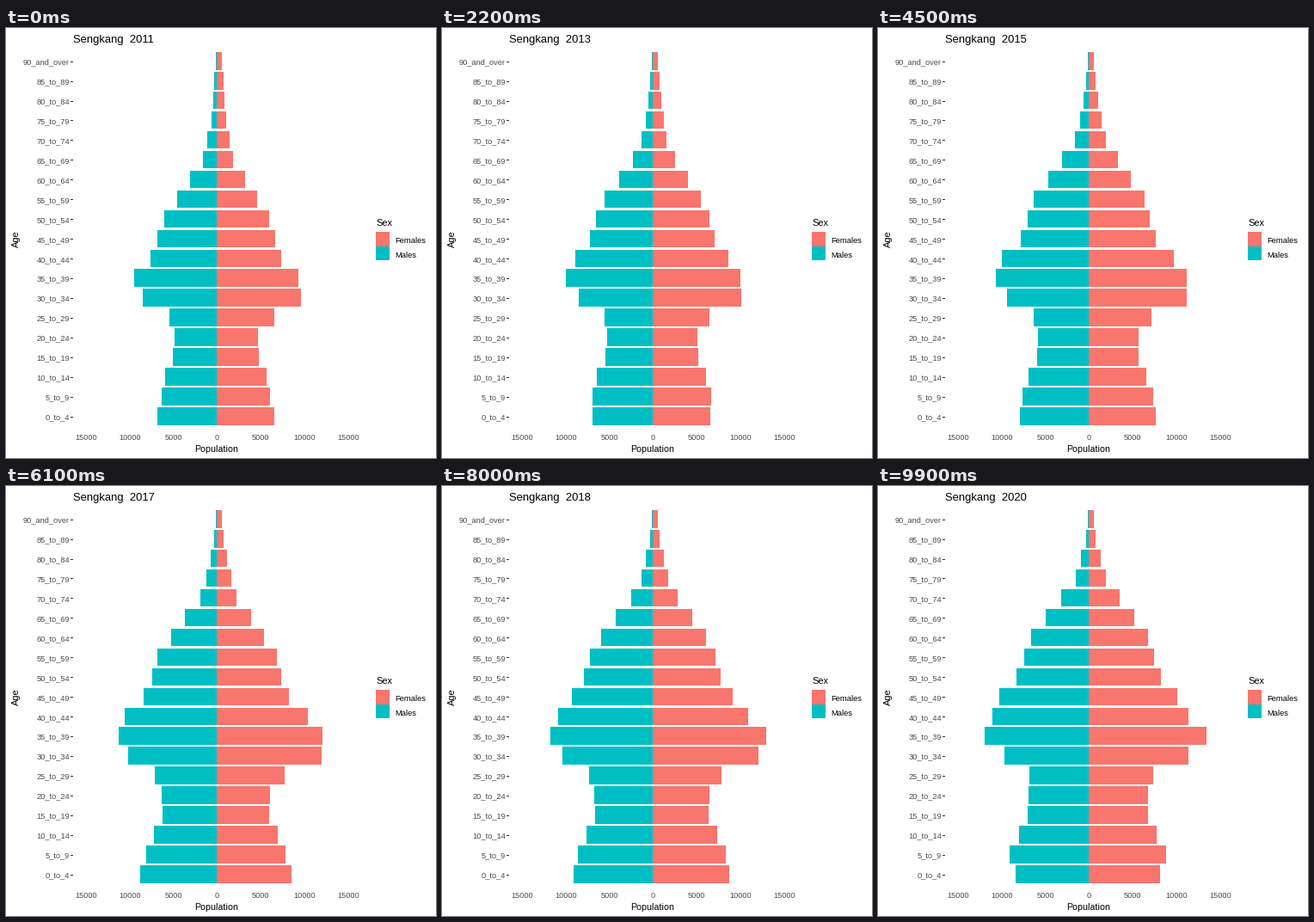
These frames come from a looping animation (500x500 px, 10 s). A matplotlib script:

```python
import numpy as np
import matplotlib.pyplot as plt
from matplotlib.animation import FuncAnimation
from matplotlib.patches import Rectangle

SIZE, DPI = 500, 100
FRAMES, STEPS_PER_YEAR = 100, 11
SALMON, TEAL, GREY = "#F8766D", "#00BFC4", "#4D4D4D"
ZERO, PX_PER_5000 = 245, 50.8
BOTTOM, PITCH, BAR_H = 451.28, 22.94, 20.46

AGES = [f"{a}_to_{a + 4}" for a in range(0, 90, 5)] + ["90_and_over"]
GROUP = np.arange(len(AGES))

# Corners of the male outline: (age group, bar length in pixels)
FIRST = [(0, 69), (2, 60), (3, 51), (4, 49), (5, 55), (6, 86), (7, 96),
         (8, 77), (10, 61), (13, 16), (15, 6), (18, 1)]
LAST = [(0, 85), (1, 92), (3, 71), (5, 69), (6, 98), (7, 121), (9, 104),
        (10, 84), (12, 67), (15, 15), (17, 3), (18, 1)]


def outline(points):
    return np.interp(GROUP, *zip(*points))


def bump(center, height, width):
    return height * np.exp(-((GROUP - center) / width) ** 2)


def males(t):
    """Drift from first to last outline, with passing swells on the way."""
    arch = np.sin(np.pi * t)
    late = 0.6 * arch - 0.7 * np.sin(2 * np.pi * t)
    late_swell = bump(0, 10, 0.6) + bump(5.6, 10, 1.2)
    ripple = (bump(8, 8, 0.4) - bump(9, 6, 0.4)
              + bump(11, 5, 0.4) - bump(14, 5, 0.4))
    drift = (1 - t) * outline(FIRST) + t * outline(LAST)
    return drift + late * late_swell + arch * ripple


def females(t):
    """Slightly fewer young, more old, and a surplus that ages over time."""
    surplus = bump(5.5 + 0.9 * t, 21 + t, 0.86 + 0.54 * t)
    return males(t) + np.interp(GROUP, [8, 15], [-2.5, 5]) + surplus


plt.rcParams["font.family"] = "Liberation Sans"
fig = plt.figure(figsize=(SIZE / DPI, SIZE / DPI), dpi=DPI, facecolor="white")
ax = fig.add_axes([0, 0, 1, 1])
ax.set(xlim=(0, SIZE), ylim=(SIZE, 0))
ax.axis("off")


def label(x, y, s, px, color="black", ha="left", **kw):
    return ax.text(x, y, s, fontsize=px * 72 / DPI, color=color, ha=ha,
                   va="baseline", **kw)


def box(x, y, w, h, color):
    return ax.add_patch(Rectangle((x, y), w, h, facecolor=color, linewidth=0,
                                  antialiased=False))


title = label(78, 17, "", 13)
label(244.5, 493, "Population", 10.6, ha="center")
label(15, 245.5, "Age", 11, ha="center", rotation=90, rotation_mode="anchor")

for k in range(-3, 4):
    label(ZERO + 0.3 + k * PX_PER_5000, 479, str(abs(k) * 5000), 9.2, GREY, "center")

male_bars, female_bars = [], []
for i, age in enumerate(AGES):
    y = BOTTOM - i * PITCH
    label(74, y + 4, age, 9.3, GREY, "right")
    box(75, round(y + 0.3), 3, 1, "#333333")
    male_bars.append(box(ZERO, y - BAR_H / 2, 0, BAR_H, TEAL))
    female_bars.append(box(ZERO, y - BAR_H / 2, 0, BAR_H, SALMON))

label(430, 230, "Sex", 11)
for y, name, color in [(250, "Females", SALMON), (267, "Males", TEAL)]:
    box(430, y - 13, 16, 17 if color == SALMON else 16, color)
    label(452.5, y, name, 9.4)


def update(i):
    t = i / (FRAMES - 1)
    title.set_text(f"Sengkang  {round(2011 + i / STEPS_PER_YEAR)}")
    for bar, w in zip(male_bars, males(t)):
        bar.set_x(ZERO - w)
        bar.set_width(w)
    for bar, w in zip(female_bars, females(t)):
        bar.set_width(w)
    return [title, *male_bars, *female_bars]


anim = FuncAnimation(fig, update, frames=FRAMES, interval=100, repeat=True,
                     repeat_delay=0, blit=False)
plt.show()
```
